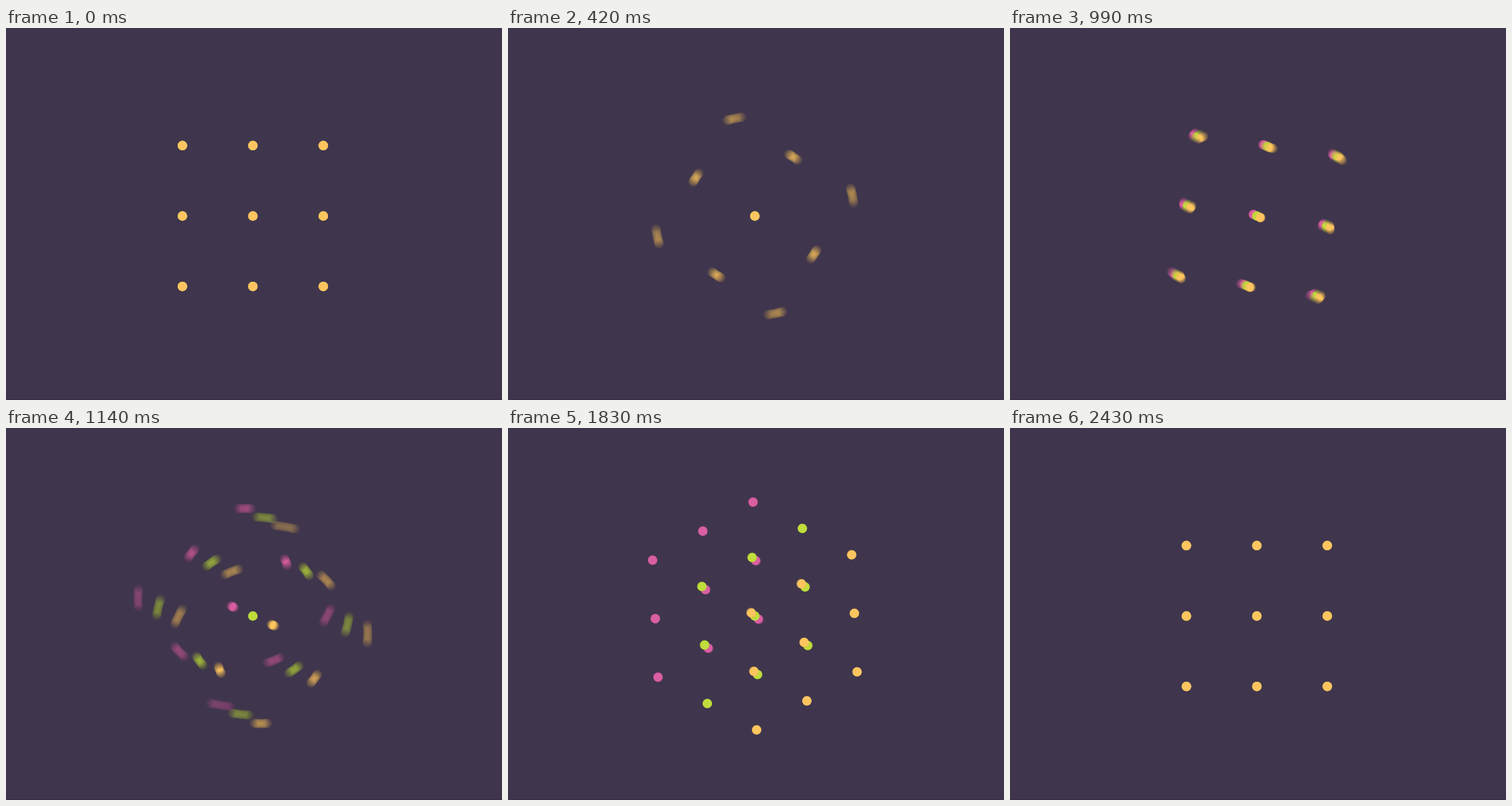
Animation, 864 px wide and 648 px high, one loop 2.73 s. Source, as an HTML page with a canvas:

```html
<!DOCTYPE html>
<html lang="en">
<head>
<meta charset="utf-8">
<title>Dot cube</title>
<style>
  html, body { margin: 0; width: 100%; height: 100%; overflow: hidden; background: #3f364d; }
  canvas { display: block; }
</style>
</head>
<body>
<canvas id="stage" width="864" height="648"></canvas>
<script>
const WIDTH = 864, HEIGHT = 648;
const LOOP = 2730, STEP = 30;
const SHUTTER = 0.82 * STEP, SAMPLES = 24;
const CENTER = { x: 430, y: 327.5 }, SPACING = 122.7, RADIUS = 8.3;
const BACKGROUND = '#3f364d';
const LAYER_COLORS = ['#d95fa2', '#bfdd3c', '#fdc55f'];

// Poses in degrees: turn about the vertical, pitch, spin in the dot plane.
const FLAT = [0, 0, 0];
const FLIPPED = [0, 0, -180];
const ISOMETRIC = [51.1, 22.9, -27.5];
const MOVES = [
  { start: 0, end: 632, from: FLAT, to: FLIPPED },
  { start: 848, end: 1541, from: FLIPPED, to: ISOMETRIC },
  { start: 1690, end: 2456, from: ISOMETRIC, to: FLAT }
];

const stage = document.getElementById('stage').getContext('2d');
const layer = document.createElement('canvas');
layer.width = WIDTH;
layer.height = HEIGHT;
const scene = layer.getContext('2d');

const range = [-1, 0, 1];
const dots = range.flatMap(z => range.flatMap(y => range.map(x => ({ x, y, z }))));

function ease(u) {
  const half = v => 0.5 * Math.pow(2 * v, 2.5);
  return u < 0.5 ? half(u) : 1 - half(1 - u);
}

function poseAt(time) {
  let move = MOVES[0];
  for (const m of MOVES) if (time >= m.start) move = m;
  const u = (time - move.start) / (move.end - move.start);
  const p = ease(Math.min(1, Math.max(0, u)));
  return move.from.map((a, i) => (a + (move.to[i] - a) * p) * Math.PI / 180);
}

function rotate(x, y, angle) {
  const c = Math.cos(angle), s = Math.sin(angle);
  return [x * c - y * s, x * s + y * c];
}

function project(dot, [turn, pitch, spin]) {
  let { x, y, z } = dot;
  [x, y] = rotate(x, y, spin);
  [z, y] = rotate(z, y, pitch);
  [z, x] = rotate(z, x, turn);
  return {
    x: CENTER.x + x * SPACING,
    y: CENTER.y + y * SPACING,
    depth: z,
    color: LAYER_COLORS[dot.z + 1]
  };
}

function drawScene(time) {
  const pose = poseAt(time);
  scene.fillStyle = BACKGROUND;
  scene.fillRect(0, 0, WIDTH, HEIGHT);
  const placed = dots.map(d => project(d, pose)).sort((a, b) => a.depth - b.depth);
  for (const { x, y, color } of placed) {
    scene.fillStyle = color;
    scene.beginPath();
    scene.arc(x, y, RADIUS, 0, Math.PI * 2);
    scene.fill();
  }
}

// Motion blur: running average of the scene over the open shutter.
function render(time) {
  for (let i = 0; i < SAMPLES; i++) {
    drawScene(time + ((i + 0.5) / SAMPLES - 0.5) * SHUTTER);
    stage.globalAlpha = 1 / (i + 1);
    stage.drawImage(layer, 0, 0);
  }
  stage.globalAlpha = 1;
  stage.fillStyle = 'rgba(0, 0, 0, 0.2)';
  stage.fillRect(0, HEIGHT - 1, WIDTH, 1);
}

let origin = null, shown = -1;
function tick(now) {
  if (origin === null) origin = now;
  const time = Math.floor(((now - origin) % LOOP) / STEP) * STEP;
  if (time !== shown) {
    shown = time;
    render(time);
  }
  requestAnimationFrame(tick);
}
render(0);
requestAnimationFrame(tick);
</script>
</body>
</html>
```
